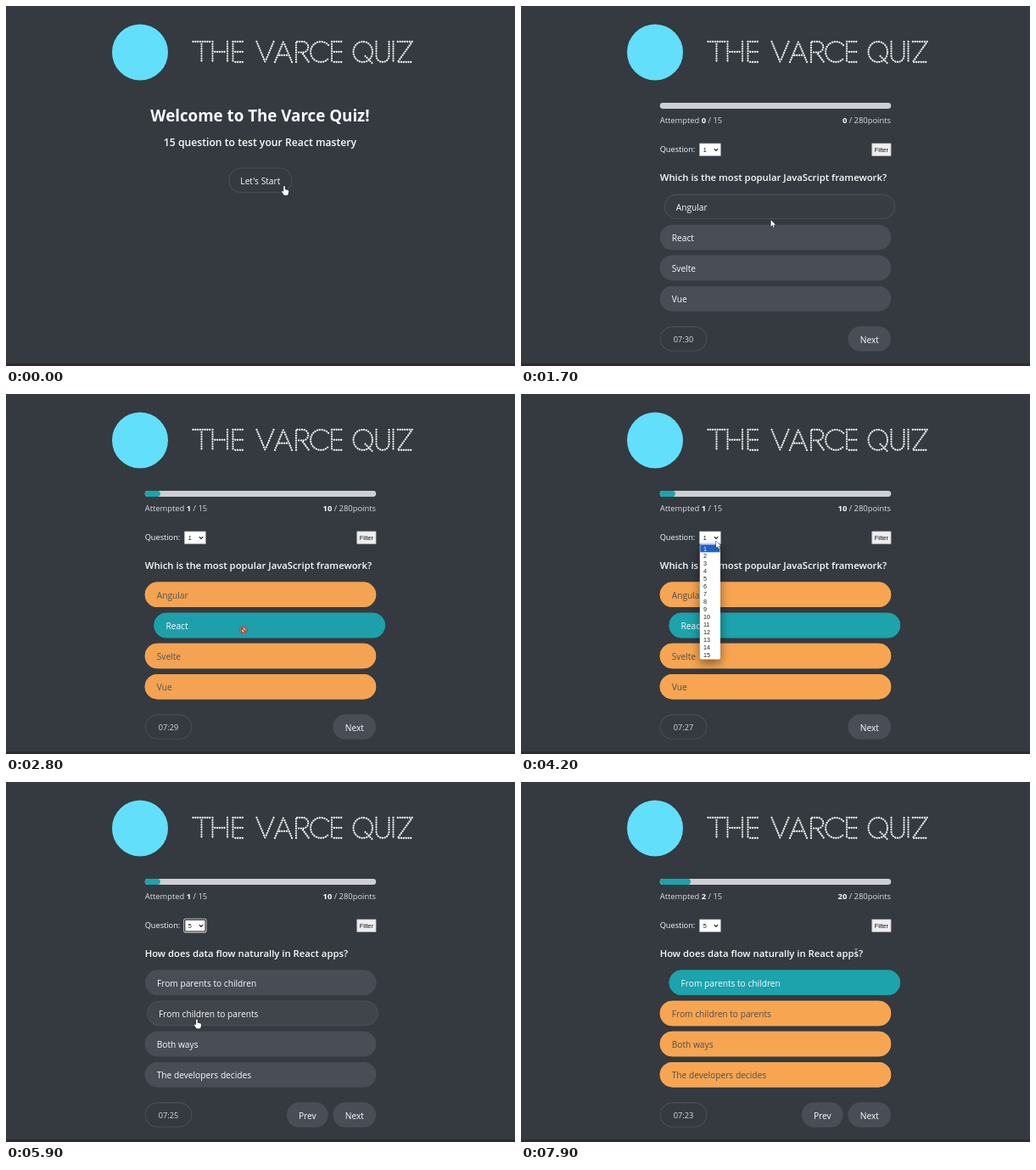
An HTML page with a canvas that plays this animation: 600x424 px, repeating every 8000 ms.

```html
<!DOCTYPE html>
<html lang="en">
<head>
<meta charset="utf-8">
<title>Quiz</title>
<style>
  html, body { margin: 0; width: 100%; height: 100%; overflow: hidden; background: #343a40; }
  canvas { display: block; width: 600px; height: 424px; }
</style>
</head>
<body>
<canvas id="stage" role="img" aria-label="The Varce Quiz"></canvas>
<script>
const canvas = document.getElementById('stage');
const ctx = canvas.getContext('2d');
const ratio = window.devicePixelRatio || 1;
canvas.width = 600 * ratio;
canvas.height = 424 * ratio;

const LOOP = 8000, STEP = 100;
const SANS = '"Open Sans", "Noto Sans", sans-serif';
const FORM = '"Liberation Sans", Arial, sans-serif';
const BG = '#343a40', GRAY = '#494d56', TEAL = '#1ca3ac', LIGHT = '#fafbfc', PALE = '#dadde1';

// Moments of the session, in ms
const START = 850, ANSWER1 = 2560, OPEN = 4050, PICK = 5100, BLUR = 7350, ANSWER2 = 7520;

// ---------- drawing helpers ----------
function text(str, x, y, size, opt = {}) {
  ctx.font = `${opt.weight || 400} ${size}px ${opt.family || SANS}`;
  ctx.textAlign = opt.align || 'left';
  ctx.fillStyle = opt.color || LIGHT;
  ctx.fillText(str, x, y);
  return ctx.measureText(str).width;
}

function box(x, y, w, h, r, fill, edge, line = 1) {
  ctx.beginPath();
  ctx.roundRect(x, y, w, h, r);
  if (fill) { ctx.fillStyle = fill; ctx.fill(); }
  if (edge) {
    ctx.beginPath();
    ctx.roundRect(x + line / 2, y + line / 2, w - line, h - line, Math.max(0, r - line / 2));
    ctx.lineWidth = line;
    ctx.strokeStyle = edge;
    ctx.stroke();
  }
}

// ---------- dotted heading ----------
const GLYPHS = {
  T: 'M0 0h20M10 2.8v21.2',
  H: 'M0 0v24M17.5 0v24M2.8 12h13',
  E: 'M0 0v24M2.8 0h11M2.8 12h9M2.8 24h11',
  V: 'M0 0l10 24M20 0l-9 21.5',
  A: 'M0 24l10-24M20 24l-9-21.5M5.5 16h10',
  R: 'M0 24v-24h8a6.3 6.3 0 0 1 0 12.6h-6M8 14.5l7 9.5',
  C: 'M19 4a12 12 0 1 0 0 16',
  Q: 'M22.5 12a11.2 12 0 1 0-22.5 0a11.2 12 0 1 0 22.5 0M14 17l8 8',
  U: 'M0 0v16.5a7.5 7.5 0 0 0 15 0v-16.5',
  I: 'M0 0v24',
  Z: 'M0 0h17l-17 24h17.5'
};
const WORDS = [
  ['THE', [220.5, 243.5, 267.5]],
  ['VARCE', [295.5, 317, 342, 361, 384]],
  ['QUIZ', [409.5, 436.5, 456.5, 461.8]]
];
for (const key in GLYPHS) GLYPHS[key] = new Path2D(GLYPHS[key]);

function heading() {
  ctx.fillStyle = '#62dffb';
  ctx.beginPath();
  ctx.arc(158, 54.5, 33, 0, 7);
  ctx.fill();

  ctx.save();
  ctx.strokeStyle = '#f4f5f6';
  ctx.lineWidth = 2.3;
  ctx.lineCap = 'round';
  ctx.setLineDash([0.01, 2.8]);
  for (const [word, places] of WORDS) {
    places.forEach((x, i) => {
      ctx.save();
      ctx.translate(x, 42);
      ctx.stroke(GLYPHS[word[i]]);
      ctx.restore();
    });
  }
  ctx.restore();
}

// ---------- option states: shift, fill, edge, ink ----------
const IDLE = [0, 73, 77, 86, 73, 77, 86, 250, 251, 252];
const HOVER = [5.43, 53, 58, 64, 73, 77, 86, 250, 251, 252];
const GOOD = [10.87, 28, 163, 172, 28, 163, 172, 250, 251, 252];
const BAD = [0, 247, 165, 81, 247, 165, 81, 73, 80, 87];

const QUESTIONS = [
  {
    title: 'Which is the most popular JavaScript framework?',
    options: ['Angular', 'React', 'Svelte', 'Vue'],
    changes: [
      [[1480, HOVER], [1690, IDLE], [ANSWER1, BAD]],
      [[1750, HOVER], [ANSWER1, GOOD]],
      [[ANSWER1, BAD]],
      [[ANSWER1, BAD]]
    ]
  },
  {
    title: 'How does data flow naturally in React apps?',
    options: ['From parents to children', 'From children to parents', 'Both ways', 'The developers decides'],
    changes: [
      [[5700, HOVER], [5795, IDLE], [6630, HOVER], [ANSWER2, GOOD]],
      [[5820, HOVER], [5960, IDLE], [6410, HOVER], [6580, IDLE], [ANSWER2, BAD]],
      [[ANSWER2, BAD]],
      [[ANSWER2, BAD]]
    ]
  }
];

// cubic-bezier(.25, .1, .25, 1)
function ease(p) {
  if (p <= 0) return 0;
  if (p >= 1) return 1;
  let lo = 0, hi = 1, u = p;
  for (let i = 0; i < 20; i++) {
    u = (lo + hi) / 2;
    const x = 0.75 * u * (1 - u) + u * u * u;
    if (x < p) lo = u; else hi = u;
  }
  return 0.3 * u * (1 - u) * (1 - u) + 3 * u * u * (1 - u) + u * u * u;
}

// A transition turned back midway takes proportionally less time, as in CSS.
function styleAt(changes, t) {
  let from = IDLE, to = IDLE, origin = null, since = -1000, span = 300;
  const progress = time => ease((time - since) / span);
  const at = time => {
    const k = progress(time);
    return from.map((v, i) => v + (to[i] - v) * k);
  };
  for (const [time, next] of changes) {
    if (time > t) break;
    const length = next === origin ? 300 * progress(time) : 300;
    from = at(time);
    origin = to;
    to = next;
    since = time;
    span = length;
  }
  return at(t);
}

const ROW = 29.5;
const optionTop = i => 221.6 + 36.1 * i;

function options(q, t) {
  q.options.forEach((label, i) => {
    const s = styleAt(q.changes[i], t);
    const rgb = k => `rgb(${s[k]}, ${s[k + 1]}, ${s[k + 2]})`;
    const y = optionTop(i);
    box(163.7 + s[0], y, 272.5, ROW, ROW / 2, rgb(1), rgb(4), 1.1);
    text(label, 177.7 + s[0], Math.round(y + 19.3), 10.2, { color: rgb(7) });
  });
}

// ---------- screens ----------
function welcome() {
  text('Welcome to The Varce Quiz!', 299.5, 135.7, 18.75, { weight: 700, align: 'center' });
  text('15 question to test your React mastery', 299.5, 165, 12.2, { weight: 600, align: 'center' });
  box(262.3, 190.5, 75, 29.5, 14.75, null, GRAY, 1.1);
  text("Let's Start", 299.8, 209.7, 10.2, { align: 'center' });
}

function status(done) {
  const bar = [163.7, 114, 272.5, 6.9, 3.45];
  box(...bar, '#cecfd4');
  if (done) {
    ctx.save();
    ctx.beginPath();
    ctx.roundRect(...bar);
    ctx.clip();
    box(163.7, 114, 272.5 * done / 15, 6.9, 3.45, TEAL);
    ctx.restore();
  }
  const small = { color: PALE }, bold = { color: LIGHT, weight: 700 };
  let x = 163.7;
  x += text('Attempted ', x, 138, 9.4, small);
  x += text(String(done), x, 138, 9.4, bold);
  text(' / 15', x, 138, 9.4, small);

  const w = text(' / 280points', 436, 138, 9.4, { color: PALE, align: 'right' });
  text(String(done * 10), 436 - w, 138, 9.4, { ...bold, align: 'right' });
}

function controls(t) {
  const form = { family: FORM, color: '#111' };
  text('Question:', 163.7, 172.4, 9.2);
  if (t >= PICK && t < BLUR) {
    box(209.4, 160.8, 27, 16.6, 2, '#fff');
    box(210.2, 161.6, 25.4, 15, 1, '#fff', '#111', 1.1);
  } else {
    box(210.3, 161.8, 25.2, 14.8, 0, '#fff', '#9a9a9a', 0.5);
  }
  text(t < PICK ? '1' : '5', 214.8, 171.9, 7.24, form);
  ctx.beginPath();
  ctx.moveTo(227.8, 168.2);
  ctx.lineTo(230, 170.4);
  ctx.lineTo(232.2, 168.2);
  ctx.lineWidth = 1.1;
  ctx.strokeStyle = '#111';
  ctx.stroke();

  box(413.6, 161.8, 22.6, 14.8, 0, '#efefef', '#b4b4b4', 0.5);
  text('Filter', 424.9, 171.8, 7.24, { ...form, align: 'center' });
}

function footer(t) {
  const left = 450 - Math.floor((t - START) / 1000);
  const two = n => String(n).padStart(2, '0');
  box(163.7, 377.3, 55.6, 29.5, 14.75, null, GRAY, 1.1);
  text(`${two(Math.floor(left / 60))}:${two(left % 60)}`, 191.5, 395.6, 9.2, { color: PALE, align: 'center' });
  if (t >= PICK) {
    box(330.9, 377.3, 48.8, 29.5, 14.75, GRAY);
    text('Prev', 355.3, 396.6, 10.2, { align: 'center' });
  }
  box(385.4, 377.3, 50.6, 29.5, 14.75, GRAY);
  text('Next', 410.8, 396.6, 10.2, { align: 'center' });
}

function menu(y) {
  const row = 8.95, top = 177.4;
  const active = Math.min(14, Math.max(0, Math.floor((y - top) / row)));
  ctx.save();
  ctx.shadowColor = 'rgba(0, 0, 0, .45)';
  ctx.shadowBlur = 12 * ratio;
  ctx.shadowOffsetY = 5 * ratio;
  box(210.8, 176.4, 24.2, 136, 2, '#fff');
  ctx.restore();
  ctx.fillStyle = '#1e60cc';
  ctx.fillRect(211.3, top + active * row, 23.2, row);
  for (let i = 0; i < 15; i++) {
    text(String(i + 1), 215, top + i * row + 7.1, 7.24, { family: FORM, color: i === active ? '#fff' : '#222' });
  }
}

// ---------- pointer ----------
const PATH = [
  [0, 328, 212], [900, 328, 212], [1300, 317, 212], [2000, 280, 278], [2900, 280, 278],
  [3800, 231, 173], [4200, 230, 173.5], [4950, 219, 217], [5610, 219, 216], [6000, 226, 292],
  [6350, 226, 291], [6700, 240, 246], [7400, 243.5, 243], [7550, 243.5, 243],
  [7900, 395, 201], [8000, 395, 201]
];
const ARROW = new Path2D('M0 0v7.8l1.8-1.7 1.2 2.6 1.2-.5-1.2-2.5h2.5z');
const HAND = new Path2D('M-.8.8a.85.85 0 0 1 1.7 0v3.2l3.6.9q.9.3.8 1.2l-.5 2.9q-.3 1.9-1.8 1.9h-2.2q-1 0-1.6-.9l-2.4-3.4q.6-1.2 2.4-.1z');
const BEAM = new Path2D('M-1.5-4.5h3M0-4.5v9M-1.5 4.5h3');

function pointerAt(t) {
  const i = Math.max(1, PATH.findIndex(p => p[0] > t));
  const [t0, x0, y0] = PATH[i - 1], [t1, x1, y1] = PATH[i];
  const u = (t - t0) / (t1 - t0), k = u * u * (3 - 2 * u);
  return [x0 + (x1 - x0) * k, y0 + (y1 - y0) * k];
}

function pointerKind(x, y, t) {
  if (t < START) return 'hand';
  if (t >= OPEN && t < PICK) return 'arrow';
  for (let i = 0; i < 4; i++) {
    const dy = y - optionTop(i);
    if (dy >= 0 && dy <= ROW && x > 164 && x < 441) {
      const answered = t >= ANSWER2 || (t >= ANSWER1 && t < PICK);
      return answered ? 'blocked' : 'hand';
    }
  }
  return y > 194 && y < 210 && x < 435 ? 'beam' : 'arrow';
}

function pointer(x, y, t) {
  const kind = pointerKind(x, y, t);
  ctx.save();
  ctx.translate(x, y);
  ctx.lineJoin = 'round';
  if (kind === 'blocked') {
    ctx.beginPath();
    ctx.arc(0, 0, 4.2, 0, 7);
    ctx.fillStyle = '#f3e9e4';
    ctx.fill();
    ctx.lineWidth = 0.6;
    ctx.strokeStyle = '#3a2a2a';
    ctx.stroke();
    ctx.beginPath();
    ctx.arc(0, 0, 3, 0, 7);
    ctx.moveTo(-2.1, -2.1);
    ctx.lineTo(2.1, 2.1);
    ctx.lineWidth = 1.5;
    ctx.strokeStyle = '#b8402c';
    ctx.stroke();
  } else if (kind === 'beam') {
    ctx.lineWidth = 0.7;
    ctx.strokeStyle = '#c4c7ca';
    ctx.stroke(BEAM);
  } else {
    const shape = kind === 'hand' ? HAND : ARROW;
    ctx.lineWidth = 1;
    ctx.strokeStyle = '#1c1e21';
    ctx.stroke(shape);
    ctx.fillStyle = '#fff';
    ctx.fill(shape);
  }
  ctx.restore();
}

// ---------- frame ----------
function draw(t) {
  ctx.setTransform(ratio, 0, 0, ratio, 0, 0);
  ctx.fillStyle = BG;
  ctx.fillRect(0, 0, 600, 424);
  ctx.fillStyle = '#2d2b31';
  ctx.fillRect(0, 421, 600, 3);
  heading();

  const [x, y] = pointerAt(t);
  if (t < START) {
    welcome();
  } else {
    const q = QUESTIONS[t < PICK ? 0 : 1];
    status((t >= ANSWER1) + (t >= ANSWER2));
    controls(t);
    text(q.title, 163.7, 205.7, 11.3, { weight: 600 });
    options(q, t);
    footer(t);
    if (t >= OPEN && t < PICK) menu(y);
  }
  pointer(x, y, t);
}

const begin = performance.now();
function tick() {
  const t = (performance.now() - begin) % LOOP;
  draw(Math.floor(t / STEP) * STEP);
  requestAnimationFrame(tick);
}
tick();
</script>
</body>
</html>
```
